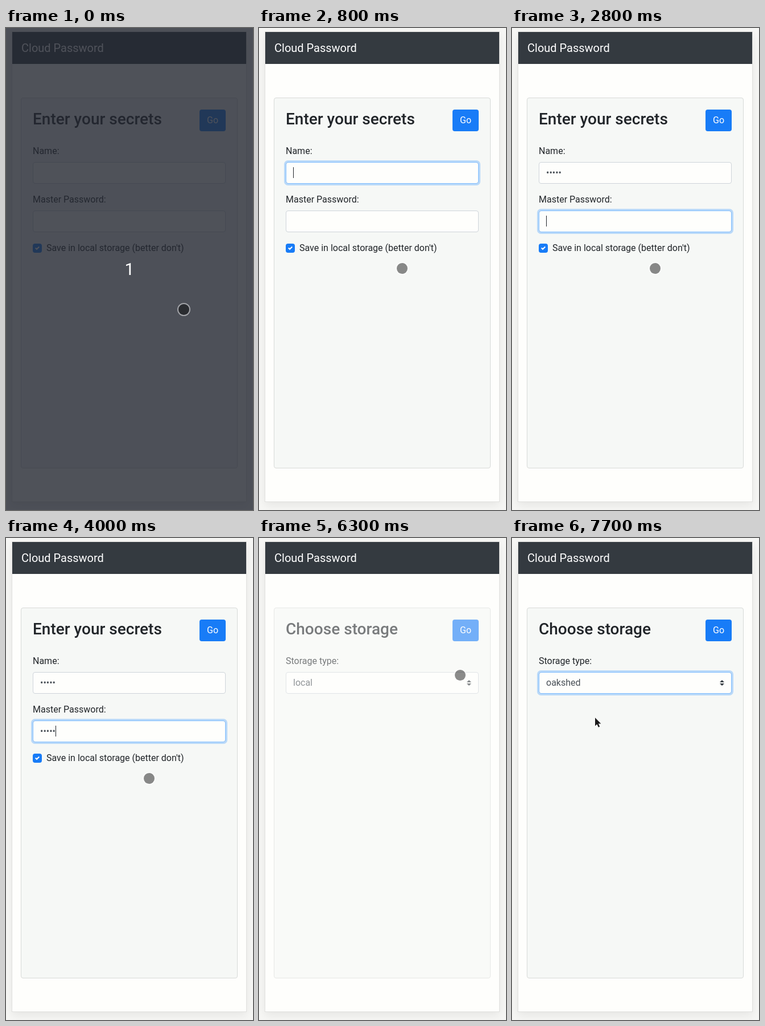
Animation, 434 px wide and 845 px high, one loop 8 s. Source, as an HTML page:

```html
<!DOCTYPE html>
<html lang="en">
<head>
<meta charset="utf-8">
<title>Cloud Password</title>
<style>
  html, body { margin: 0; width: 100%; height: 100%; overflow: hidden; background: #f7f7f5; }
  svg { display: block; width: 434px; height: 845px; }
  text { font: 16px Roboto, sans-serif; fill: #212529; white-space: pre; }
  .page { fill: #fefefc; stroke: #e0e0de; filter: drop-shadow(0 6px 8px rgba(0,0,0,.07)); }
  .card { fill: #f6f8f6; stroke: #d8dad8; }
  .box { fill: #fefefc; stroke: #ced4da; }
  .ring rect { fill: none; stroke: #80bdff; }
  .ring .glow { stroke: rgba(0,123,255,.25); stroke-width: 3; }
  .blue { fill: #187cf7; }
  .light { fill: #fff; }
  .value { fill: #495057; }
  .title { font-size: 28px; font-weight: 500; }
  .popup { fill: #fefefc; stroke: #cfcfcf; filter: drop-shadow(0 1px 3px rgba(0,0,0,.25)); }
</style>
</head>
<body>
<svg viewBox="0 0 434 845">
  <defs>
    <rect id="field" class="box" x="47.5" y="235.5" width="338" height="37" rx="3.5"/>
    <g id="focus" class="ring">
      <rect class="glow" x="45.5" y="233.5" width="342" height="41" rx="5.5"/>
      <rect x="47.5" y="235.5" width="338" height="37" rx="3.5"/>
    </g>
    <g id="frame">
      <rect class="card" x="26.5" y="122.5" width="380" height="649" rx="3.5"/>
      <rect class="blue" x="340" y="143" width="46" height="38" rx="4"/>
      <text class="light" x="353" y="167">Go</text>
    </g>
  </defs>

  <rect class="page" x="10.5" y="6.5" width="412" height="824"/>
  <rect x="11" y="7" width="411" height="56" fill="#343a40"/>
  <text class="light" x="27" y="42" style="font-size:20px">Cloud Password</text>

  <g id="secrets">
    <use href="#frame"/>
    <text class="title" x="47" y="169">Enter your secrets</text>
    <text x="47" y="221">Name:</text>
    <use href="#field"/>
    <use href="#focus" id="nameRing"/>
    <text class="value" id="name" x="60" y="259"></text>
    <text x="47" y="306">Master Password:</text>
    <use href="#field" y="85"/>
    <use href="#focus" id="passRing" y="85"/>
    <text class="value" id="pass" x="60" y="344"></text>
    <rect id="caret" width="1" height="19" fill="#212529"/>
    <rect class="blue" x="47" y="378" width="16" height="16" rx="4"/>
    <path class="light" transform="translate(51 382)" d="M6.56.75 2.97 4.36 1.44 2.81 0 4.26 2.97 7.25 8 2.19z"/>
    <text x="71" y="391">Save in local storage (better don't)</text>
  </g>

  <g id="storage">
    <use href="#frame"/>
    <text class="title" x="47" y="169">Choose storage</text>
    <text x="47" y="221">Storage type:</text>
    <use href="#field"/>
    <use href="#focus" id="typeRing"/>
    <text class="value" id="type" x="60" y="259"></text>
    <path fill="#343a40" transform="translate(365 249) scale(2)" d="M2 0 0 2h4zM2 5 0 3h4z"/>
    <g id="popup">
      <rect class="popup" x="47.5" y="273.5" width="338" height="68"/>
      <rect id="hover" x="48" width="337" height="34" fill="#e2e2e2"/>
      <text class="value" x="60" y="296">local</text>
      <text class="value" x="60" y="330">oakshed</text>
    </g>
  </g>

  <g id="countdown">
    <rect width="434" height="845" fill="rgba(35,39,49,.8)"/>
    <text class="light" x="217" y="433" text-anchor="middle" style="font-size:30px">1</text>
  </g>
  <g id="dot">
    <circle r="10.5" fill="none" stroke="#fff" stroke-width="2" stroke-opacity=".48"/>
    <circle r="9.5" fill-opacity=".45"/>
  </g>
  <path id="arrow" d="M0 0V14.5L3.4 11.4 5.8 16.8 8.2 15.7 5.8 10.5H10.4z" fill="#1b1b1b" stroke="#fff" stroke-width="1" paint-order="stroke"/>
</svg>
<script>
const LOOP = 8000, STEP = 100, BULLET = 5.39;
const el = id => document.getElementById(id);
const show = (id, on) => el(id).style.display = on ? '' : 'none';
const fade = (id, value) => el(id).style.opacity = value;
const place = (id, [x, y]) => el(id).setAttribute('transform', `translate(${x} ${y})`);

// Key times of the typed characters
const nameKeys = [1500, 1700, 1800, 1800, 1900];
const passKeys = [3300, 3400, 3600, 3800, 4000, 4100, 4200, 4400];
const caretEvents = [600, ...nameKeys, 2700, ...passKeys];

// Pointer paths: time, x, y
const dotPath = [
  [100, 312.5, 493.5], [400, 251.5, 254], [600, 251.5, 254], [800, 251.5, 421.5],
  [5400, 251.5, 421.5], [5700, 323.5, 167.5], [5800, 360, 164], [6000, 361, 166],
  [6300, 353.5, 240.5], [6400, 353.5, 240.5], [6500, 358.5, 260.5],
  [6700, 358.5, 260.5], [6800, 325.5, 270.5], [6900, 325.5, 270.5], [7000, 290.5, 262.5]
];
const arrowPath = [[7100, 250, 280], [7500, 146, 315]];

function along(path, t) {
  const next = path.findIndex(p => p[0] > t);
  if (next < 0) return path[path.length - 1].slice(1);
  if (!next) return path[0].slice(1);
  const [t0, x0, y0] = path[next - 1], [t1, x1, y1] = path[next];
  const k = (t - t0) / (t1 - t0);
  return [x0 + (x1 - x0) * k, y0 + (y1 - y0) * k];
}

const ramp = (t, start) => Math.min(1, Math.max(0, (t - start + STEP) / 200));
const typed = (keys, t) => keys.filter(k => k <= t).length;

function draw(now) {
  const t = Math.floor(now % LOOP / STEP) * STEP;
  const names = typed(nameKeys, t), passes = typed(passKeys, t);
  const inPass = t >= 2700, popup = t >= 7100 && t < 7700;

  show('countdown', t < 100);
  show('secrets', t < 6200);
  show('storage', t >= 6200);
  fade('secrets', t < 5900 ? 1 : Math.max(0, 1 - (t - 5800) / 300));
  fade('storage', t < 6300 ? .3 : t < 6500 ? .6 : 1);

  el('name').textContent = '•'.repeat(names);
  el('pass').textContent = '•'.repeat(passes);
  fade('nameRing', ramp(t, 600) - ramp(t, 2700));
  fade('passRing', ramp(t, 2700) - ramp(t, 5900));
  fade('typeRing', ramp(t, 7000));

  // The caret restarts its blink at every key press
  const last = Math.max(...caretEvents.filter(e => e <= t));
  show('caret', t >= 600 && t < 5900 && (t - last) % 1000 < 500);
  place('caret', [Math.round(60 + BULLET * (inPass ? passes : names)), inPass ? 329 : 244]);

  const arrow = along(arrowPath, t);
  show('popup', popup);
  el('hover').setAttribute('y', arrow[1] < 308 ? 274 : 308);
  el('type').textContent = t < 7700 ? 'local' : 'oakshed';

  show('dot', t < 7100);
  place('dot', along(dotPath, t));
  show('arrow', t >= 7100);
  place('arrow', arrow);
}

const start = performance.now();
function tick() {
  draw(performance.now() - start);
  requestAnimationFrame(tick);
}
tick();
</script>
</body>
</html>
```
